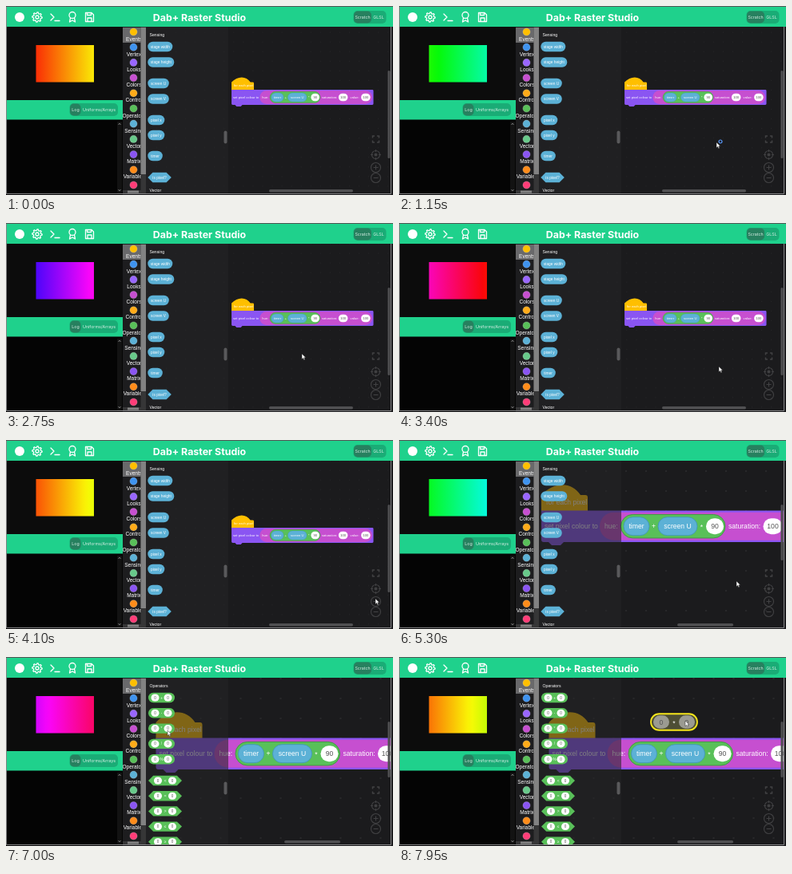
Write an HTML page that moves like this. It is 484 px wide and 237 px high and loops after 8 s.

```html
<!DOCTYPE html>
<html lang="en">
<head>
<meta charset="utf-8">
<title>Shader editor</title>
<style>
html, body { margin: 0; width: 100%; height: 100%; overflow: hidden; background: #1b1b1d; }
svg { display: block; width: 484px; height: 237px; }
text { font-family: "Liberation Sans", Arial, sans-serif; fill: #fff; dominant-baseline: central; }
.mid { text-anchor: middle; }
.title { font: 700 12.4px Inter, "Open Sans", sans-serif; }
.toggle text { font: 5.3px Inter, "Open Sans", sans-serif; fill: #d8efe6; }
.block text { font-size: 8.6px; }
.block .dark, .dark { fill: #555; }
.icon { fill: none; stroke: #fff; stroke-width: 1.3; stroke-linecap: round; stroke-linejoin: round; }
.control { fill: none; stroke: #414143; stroke-width: 1.1; }
</style>
</head>
<body>
<svg viewBox="0 0 484 237">
  <defs>
    <clipPath id="area"><rect x="175" y="26" width="306" height="209"/></clipPath>
    <clipPath id="names"><rect x="146" y="26" width="23" height="205"/></clipPath>
    <clipPath id="drawer"><rect x="175" y="26" width="103" height="209"/></clipPath>
    <pattern id="dots" width="25" height="25" patternUnits="userSpaceOnUse"><circle cx="9" cy="14" r=".8" fill="#39393b"/></pattern>
    <linearGradient id="hue"></linearGradient>
  </defs>
  <rect width="484" height="237" fill="#1b1b1d"/>

  <g clip-path="url(#area)">
    <g id="workspace" class="block">
      <rect x="-100" y="-400" width="1000" height="1000" fill="url(#dots)"/>
      <path d="M178 90V69C194 52 216 52 227 69H233q3 0 3 3V90z" fill="#ffbf00"/>
      <path d="M178 88.500H543q3 0 3 3V125q0 3-3 3H206l-4 4h-11l-4-4h-6q-3 0-3-3z" fill="#8a55f2"/>
      <g id="blocks"></g>
    </g>
    <rect id="vscroll" x="477.500" y="81" width="3" rx="1.500" fill="#505052"/>
    <rect id="hscroll" y="230" height="3.500" rx="1.700" fill="#505052"/>
    <g class="control">
      <path d="M458.500 165.500v-2.500h2.500M464 163h2.500v2.500M466.500 168.500v2.500h-2.500M461 171h-2.500v-2.500" stroke-width="1.500"/>
      <circle cx="462.500" cy="186.500" r="5"/><circle cx="462.500" cy="186.500" r="1.500" fill="#414143"/>
      <path d="M462.500 180v3M462.500 190v3M456 186.500h3M466 186.500h3"/>
      <circle cx="462.500" cy="202.500" r="6"/><path d="M459.500 202.500h6M462.500 199.500v6"/>
      <circle cx="462.500" cy="215.500" r="6"/><path d="M459.500 215.500h6"/>
    </g>
  </g>

  <rect x="175" y="26" width="103" height="209" fill="#252527" opacity=".58"/>
  <g clip-path="url(#drawer)"><g id="flyout"></g></g>
  <rect x="272.500" y="156.500" width="4" height="16" rx="2" fill="#59595b"/>

  <rect x="146" y="26" width="29" height="209" fill="#1d1d1f"/>
  <rect x="146" y="27" width="23" height="19" fill="#69696b"/>
  <rect id="hover" x="146" y="122" width="23" height="19" fill="#4b4b4d"/>
  <g id="categories" clip-path="url(#names)"></g>
  <rect x="168.500" y="26" width="6.500" height="209" fill="#363637"/>
  <rect x="168.500" y="27" width="6.500" height="184" fill="#828282"/>
  <rect x="146" y="231" width="29" height="4" fill="#363637"/>
  <rect x="152" y="231.500" width="14" height="3" fill="#828282"/>

  <rect y="26" width="146" height="211" fill="#040404"/>
  <rect x="1" y="26" width="145" height="92" fill="#0c0c0c"/>
  <rect x="37.500" y="49" width="72.500" height="46.500" fill="url(#hue)"/>
  <rect x="1" y="118" width="145" height="24.500" fill="#1fd18c"/>
  <rect x="139" y="145" width="6" height="90" fill="#121212"/>
  <path d="M140.500 149l1.500-2 1.500 2M140.500 230l1.500 2 1.500-2" fill="none" stroke="#777"/>
  <g class="toggle">
    <rect x="79.500" y="122" width="60.500" height="16" rx="5" fill="#1aac76"/>
    <rect x="80" y="122.500" width="13.500" height="15" rx="5" fill="#27805f"/>
    <text class="mid" x="87" y="130">Log</text><text class="mid" x="116.500" y="130">Uniforms/Arrays</text>
  </g>

  <rect width="484" height="26" fill="#1fd18c"/>
  <circle cx="17" cy="14" r="6" fill="#fff"/>
  <g class="icon">
    <circle cx="39" cy="14" r="2"/>
    <path id="gear"/>
    <path d="M56 10l4 4-4 4M61 18.500h6"/>
    <circle cx="83" cy="11.500" r="4"/><path d="M80.500 15l-1 5 3.500-2 3.500 2-1-5"/>
    <path d="M99.500 8.500h7.500l2.500 2.500v8.500h-10zM101.500 8.500v3h5v-3M102 19v-4h5v4"/>
  </g>
  <text class="title mid" x="242" y="14">Dab+ Raster Studio</text>
  <g class="toggle">
    <rect x="434.500" y="6" width="41" height="16" rx="5" fill="#1aac76"/>
    <rect x="435" y="6.500" width="22" height="15" rx="5" fill="#27805f"/>
    <text class="mid" x="446" y="14">Scratch</text><text class="mid" x="466" y="14">GLSL</text>
  </g>
  <path d="M.5 0V235.500H481.500V26" fill="none" stroke="#858587"/>
  <path d="M0 .5H484" stroke="#555"/>

  <g id="dragged" class="block"></g>
  <g id="cursor">
    <circle id="busy" cx="5" cy="-1" r="2" fill="none" stroke="#5a9cff" stroke-width="1.200"/>
    <path d="M0 0V7.500L1.800 5.900 3 8.500 4.300 7.900 3.100 5.400H5.500z" transform="scale(.9)" fill="#fff" stroke="#222" stroke-width=".5"/>
  </g>
</svg>
<script>
const $ = id => document.getElementById(id);
const LOOP = 8000, STEP = 50, ZOOM = 1.2;
const BLUE = '#5cb1d6', GREEN = '#59c059';

const label = (x, y, text, size, cls = 'mid') =>
  `<text class="${cls}" x="${x}" y="${y}"${size ? ` style="font-size:${size}px"` : ''}>${text}</text>`;
const pill = (x, y, w, h, fill, extra = '') =>
  `<rect x="${x}" y="${y - h / 2}" width="${w}" height="${h}" rx="${h / 2}" fill="${fill}" ${extra}/>`;
const hex = (x, y, w, h, fill) =>
  `<path d="M${x} ${y}l${h / 2} ${-h / 2}h${w - h}l${h / 2} ${h / 2}l${-h / 2} ${h / 2}h${h - w}z" fill="${fill}"/>`;

// Workspace blocks, laid out at full zoom
const rowY = 108.2;
const field = (x, w, value) => pill(x, rowY, w, 20, '#fff') + label(x + w / 2, rowY, value, 0, 'mid dark');
$('blocks').innerHTML =
  label(184, 78, 'for each pixel', 0, '') +
  label(182, rowY, 'set pixel colour to', 0, '') +
  pill(251, rowY, 292, 35, '#c64fd0') +
  label(257, rowY, 'hue:', 0, '') +
  pill(277.5, rowY, 130.5, 29.5, GREEN, 'stroke="#429a42"') +
  pill(281, rowY, 32, 23, BLUE, 'stroke="#3e93b8" stroke-width=".8"') + label(297, rowY, 'timer') +
  label(318.5, rowY, '+') +
  pill(324, rowY, 49, 23, BLUE, 'stroke="#3e93b8" stroke-width=".8"') + label(348.5, rowY, 'screen U') +
  label(378.5, rowY + 1, '*') + field(384, 22, 90) +
  label(412, rowY, 'saturation:', 0, '') + field(455.5, 24, 100) +
  label(486, rowY, 'value:', 0, '') + field(514, 24, 100);

$('dragged').innerHTML =
  pill(-29, 0, 58, 20.5, '#4d4e35', 'stroke="#f5e51c" stroke-width="1.800"') +
  [-16, 16].map(x => pill(x - 10, 0, 20, 16.5, '#9b9b92') + label(x, 0, 0, 0, 'mid dark')).join('') +
  label(0, 1, '*');

// Block drawer
const sensing = [['stage width', 51, 31], ['stage height', 70.5, 33], ['screen U', 97, 26.5], ['screen V', 116.5, 26.5],
  ['pixel x', 143, 21], ['pixel y', 162, 21], ['timer', 188, 18.5]];
const sensingDrawer = label(179.5, 36, 'Sensing', 5.2, '') +
  sensing.map(([text, y, w]) => pill(177.3, y, w, 12.4, BLUE) + label(177.3 + w / 2, y, text, 4.8)).join('') +
  hex(177.3, 215, 29.5, 12.4, BLUE) + label(192, 215, 'is pixel?', 4.8) + label(179.5, 231, 'Vector', 5.2, '');

const operator = (symbol, y, shape, w, gap) => {
  const mid = 178 + w / 2;
  const hole = x => pill(x - 5, y, 10, 9, '#fff') + label(x, y, 0, 4.6, 'mid dark');
  return shape(178, y, w, 12.4, GREEN) + hole(mid - gap) + hole(mid + gap) + label(mid, y, symbol, 4.6);
};
const operatorDrawer = label(179.5, 36, 'Operators', 5.2, '') +
  ['+', '-', '*', '/', '%'].map((s, i) => operator(s, 51 + 19.3 * i, pill, 33, 8)).join('') +
  ['&lt;', '=', '&gt;', '≤', '≥'].map((s, i) => operator(s, 155 + 19.2 * i, hex, 42, 9)).join('');
$('flyout').innerHTML = sensingDrawer + `<g transform="translate(0 220)">${operatorDrawer}</g>`;

// Category list
const categories = [['Events', '#ffbf00'], ['Vertex', '#3f93ef'], ['Looks', '#9966ff'], ['Colors', '#c64fd0'],
  ['Control', '#ffab19'], ['Operators', GREEN], ['Sensing', BLUE], ['Vector', '#68c98a'],
  ['Matrix', '#8a55f2'], ['Variables', '#ff8c1a'], ['', '#ff3d78']];
$('categories').innerHTML = categories.map(([name, fill], i) => {
  const y = 32.5 + 19.2 * i;
  return `<circle cx="159.500" cy="${y}" r="4.600" fill="${fill}" stroke="#ddd" stroke-opacity=".35" stroke-width=".7"/>` +
    label(160, y + 8.5, name, 6.5);
}).join('');

$('gear').setAttribute('d', 'M' + Array.from({ length: 32 }, (_, i) => {
  const r = i % 4 < 2 ? 6.2 : 4.6, a = i * Math.PI / 16;
  return `${(39 + r * Math.cos(a)).toFixed(2)} ${(14 + r * Math.sin(a)).toFixed(2)}`;
}).join('L') + 'z');

const clamp = v => Math.min(1, Math.max(0, v));
const ease = v => v * v * (3 - 2 * v);
const span = (t, a, b) => ease(clamp((t - a) / (b - a)));

// [time, x, y]
const pointer = [[0, 490, 130], [500, 484, 140], [1150, 397, 171], [1700, 388, 174], [2750, 370, 164], [3400, 400, 180],
  [4000, 462, 199], [4850, 462, 199], [5300, 422, 177], [5400, 422, 177], [5700, 432, 190], [6150, 148, 138],
  [6350, 148, 138], [6900, 202, 92], [7050, 202, 92], [7900, 358, 80], [8000, 358, 80]];
function pointerAt(t) {
  const i = pointer.findIndex(p => p[0] > t);
  const [a, b] = [pointer[i - 1], pointer[i]];
  const k = ease((t - a[0]) / (b[0] - a[0]));
  return [a[1] + (b[1] - a[1]) * k, a[2] + (b[2] - a[2]) * k];
}

const STOPS = 12;
$('hue').innerHTML = Array.from({ length: STOPS + 1 }, (_, i) => `<stop offset="${i / STOPS}"/>`).join('');
const stops = [...$('hue').children];

function draw(t) {
  const hue = 10 + t * .09 + Math.max(0, t - 6150) * .012;
  stops.forEach((stop, i) => stop.setAttribute('stop-color', `hsl(${(hue + 46 * i / STOPS) % 360} 96% 50%)`));

  // Zoom about the workspace centre, then pan
  const clicks = [4250, 4400, 4550, 4700].filter(c => t >= c).length;
  const scale = ZOOM ** (clicks - 4);
  const pan = span(t, 5400, 5700);
  const lift = t < 1750 ? -5 : 0;
  $('workspace').setAttribute('transform',
    `translate(${379 + 9.5 * pan} ${130 + lift + 13 * pan}) scale(${scale}) translate(-379 -130)`);

  const barWidth = 105 - 8.75 * clicks;
  $('hscroll').setAttribute('x', 381.5 + 0.4 * clicks - barWidth / 2);
  $('hscroll').setAttribute('width', barWidth);
  $('vscroll').setAttribute('height', 110 - 10 * clicks);

  $('flyout').setAttribute('transform', `translate(0 ${-220 * span(t, 6200, 6600)})`);
  $('hover').style.display = t >= 6050 && t < 6450 ? '' : 'none';

  const [x, y] = pointerAt(t);
  $('cursor').setAttribute('transform', `translate(${x} ${y})`);
  $('busy').style.display = t >= 850 && t < 1500 ? '' : 'none';
  $('dragged').style.display = t >= 7100 ? '' : 'none';
  $('dragged').setAttribute('transform', `translate(${x - 14} ${y + 1.5})`);
}

const start = performance.now();
function tick() {
  const t = (performance.now() - start) % LOOP;
  draw(Math.floor(t / STEP) * STEP);
  requestAnimationFrame(tick);
}
draw(0);
requestAnimationFrame(tick);
</script>
</body>
</html>
```
